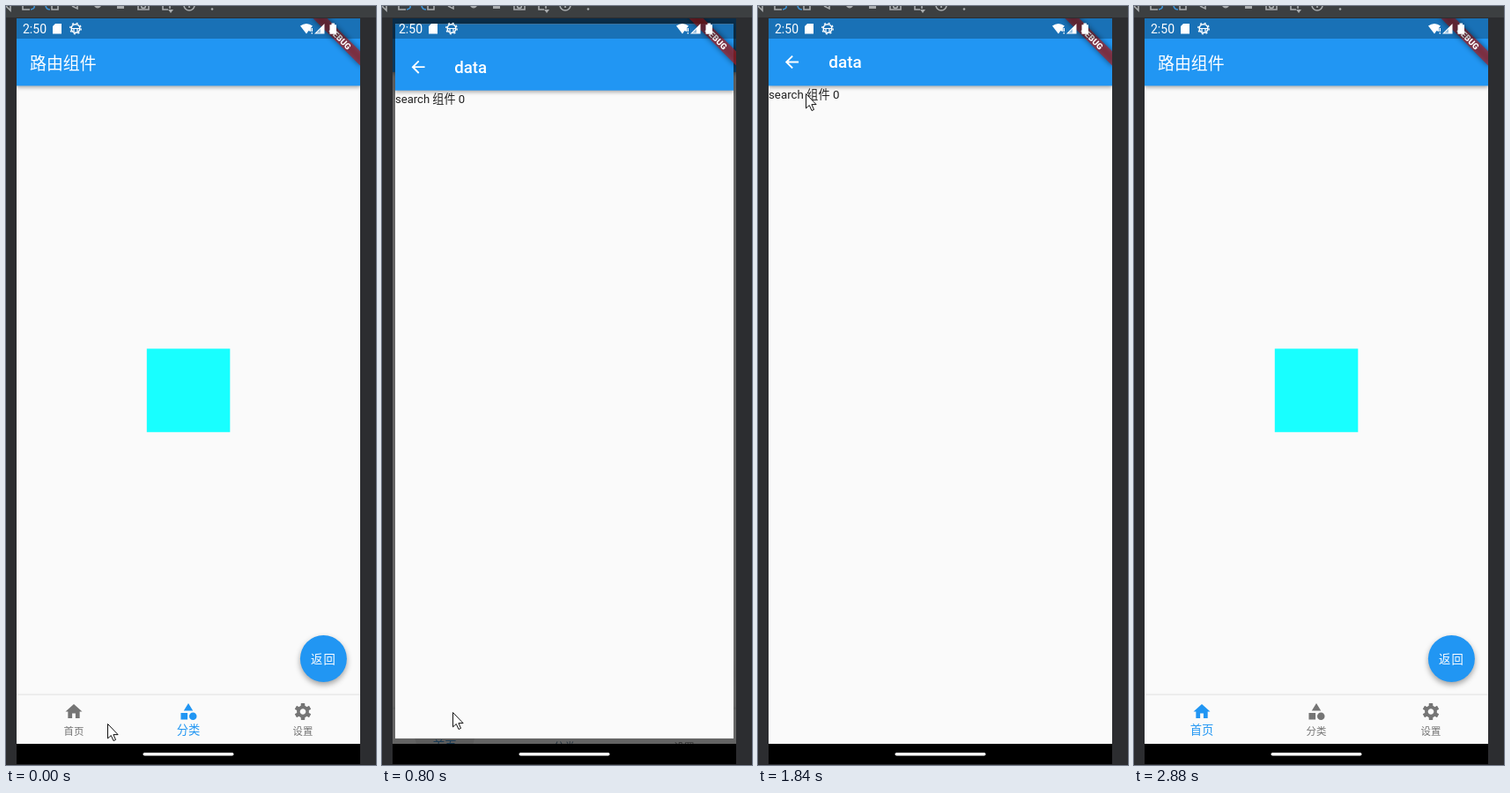
These frames come from a looping animation (420 by 860 pixels, 3.28 s). An HTML page:

```html
<!DOCTYPE html>
<html lang="zh">
<head>
<meta charset="utf-8">
<style>
html, body { margin: 0; width: 100%; height: 100%; overflow: hidden; background: #2c2d30; }
svg { display: block; width: 100%; height: 100%; }
text { font-family: Roboto, "Noto Sans CJK SC", "Noto Sans CJK", sans-serif; white-space: pre; }
.bar { fill: #2196f3; filter: drop-shadow(0 2px 2px rgba(0,0,0,.32)); }
.tabs text { text-anchor: middle; }
.tools { fill: none; stroke: #a9acae; stroke-width: 1.6; }
</style>
</head>
<body>
<svg viewBox="0 0 420 860">
  <defs>
    <clipPath id="screen"><rect x="12" y="14" width="390" height="822"/></clipPath>
    <clipPath id="tabBar"><rect x="12" y="781" width="390" height="60"/></clipPath>
  </defs>

  <rect width="420" height="860" fill="#2c2d30"/>
  <rect width="420" height="13" fill="#3c3f41"/>
  <g class="tools">
    <path d="M0 0L5 5V0M19 0V4H27M52 0V4H59V0M75 0L81 3V0M178 0V4H184M186 0V3M208 0V2"/>
    <path d="M28 4Q33 3 32 0M45 0Q46 4 50 4" stroke="#3d94d8"/>
    <path d="M100 0Q104 5 108 0Z M126 0H134V3H126Z" fill="#a9acae" stroke="none"/>
    <path d="M150 0V4H162V0"/><circle cx="156" cy="0" r="2.4"/>
    <path d="M184 4H190L187 8Z" fill="#a9acae" stroke="none"/>
    <circle cx="208" cy="-1" r="6"/>
    <circle cx="234" cy="3.5" r="1.3" fill="#a9acae" stroke="none"/>
  </g>

  <g clip-path="url(#screen)">
    <g id="back">
      <rect x="12" y="14" width="390" height="846" fill="#fafafa"/>
      <rect class="bar" x="12" y="14" width="390" height="76.4"/>
      <text x="27" y="71.7" font-size="18.9" fill="#fff">路由组件</text>
      <rect x="159.8" y="388.3" width="94.5" height="94.5" fill="#18ffff"/>
      <rect x="12" y="781" width="390" height="79" fill="#fafafa" style="filter:drop-shadow(0 -1px 1px rgba(0,0,0,.1))"/>
      <circle id="tabRipple" cx="77" cy="807" r="33" fill="#000" fill-opacity=".065" clip-path="url(#tabBar)"/>
      <g class="tabs" id="tabs"></g>
      <circle cx="360.4" cy="739.6" r="26.5" fill="#2196f3" style="filter:drop-shadow(0 3px 3px rgba(0,0,0,.36))"/>
      <text x="346" y="745.4" font-size="13.3" letter-spacing="1.1" fill="#fff">返回</text>
    </g>
    <rect id="scrim" x="12" y="14" width="390" height="822"/>
    <g id="front">
      <rect x="12" y="14" width="390" height="822" fill="#fafafa"/>
      <rect class="bar" x="12" y="14" width="390" height="76.4"/>
      <circle id="backRipple" cx="38.5" cy="63.5" r="19" fill="#fff" fill-opacity=".2"/>
      <path transform="translate(27.1 52.1) scale(.95)" fill="#fff" d="M20 11H7.83l5.59-5.59L12 4l-8 8 8 8 1.41-1.41L7.83 13H20z"/>
      <text x="80.3" y="70.3" font-size="18.9" font-weight="500" fill="#fff">data</text>
      <text x="12" y="105" font-size="13.3" fill="#212121">search 组件 0</text>
    </g>

    <g transform="translate(379.3 36.7) rotate(45)">
      <rect x="-38" y="-5.7" width="76" height="11.4" fill-opacity=".5" style="filter:blur(3px)"/>
      <rect x="-38" y="-5.7" width="76" height="11.4" fill="#b71c1c" fill-opacity=".63"/>
      <text y="3.5" font-size="9.6" font-weight="900" text-anchor="middle" fill="#fff">DEBUG</text>
    </g>
    <rect x="12" y="14" width="390" height="23" fill-opacity=".25"/>
    <g fill="#fff">
      <text x="19" y="31" font-size="14">2:50</text>
      <path d="M53 23L56 20H63V31.5H53Z"/>
      <g fill="none" stroke="#fff">
        <circle cx="79" cy="25.5" r="4.8" stroke-width="1.5"/>
        <circle cx="79" cy="25.5" r="6.2" stroke-width="1.4" stroke-dasharray="2 2.87"/>
        <path d="M74.5 25.5H83.5M77 25.5V29.5M81 25.5V29.5" stroke-width="1.2"/>
      </g>
      <path d="M334 22.5Q341 17.5 348 22.5L346 25V29L343.5 28L341 31.5ZM346.6 25H348V29H346.6ZM346.6 30H348V31.5H346.6Z"/>
      <path d="M350 31.5L361.5 20V31.5Z"/>
      <path d="M352.5 30.6L357 26V30.6Z" fill="#1970b6" fill-opacity=".45"/>
      <path d="M367.5 21.2H369.5V19.5H373V21.2H375V31.8H367.5Z"/>
    </g>
  </g>

  <rect x="12" y="836" width="390" height="23" fill="#000"/>
  <rect x="155.5" y="846" width="103" height="3.6" rx="1.8" fill="#fff"/>
  <path id="cursor" d="M0 0V16.4L3.8 13L6.5 19L9 17.9L6.4 12.1H11.6Z" fill="#fff" stroke="#111" stroke-width="1"/>
</svg>
<script>
const LOOP = 3280, STEP = 80;
const PUSH = 670, POP = 2158, ZOOM_TIME = 300, TAB_TIME = 200;
const $ = id => document.getElementById(id);

// Stops of the pointer: ms, x, y.
const stops = [[0, 115, 813], [480, 66, 792], [720, 66, 792], [880, 94, 808], [1440, 38, 218],
  [1700, 34, 62], [1840, 54, 99], [2160, 54, 99], [2240, 61, 112], [2560, 425, 210]];

const lerp = (a, b, p) => a + (b - a) * p;
const progress = (t, from, to) => Math.min(1, Math.max(0, (t - from) / (to - from)));
const smooth = p => p * p * (3 - 2 * p);

// Slow start for the first sixth, then a long ease-out.
const zoomEase = v => v < 1 / 6
  ? .4 * (6 * v) ** 3
  : 1 - .6 * (1 - progress(v, 1 / 6, 1)) ** 4.6;

function pointer(t) {
  const last = stops.length - 1;
  const i = Math.min(last, stops.findIndex(stop => stop[0] > t) + last + 1 - (last + 1)) ;
  const next = i < 0 ? last : i;
  const a = stops[next - 1], b = stops[next];
  const p = progress(t, a[0], b[0]);
  return [lerp(a[1], b[1], p), lerp(a[2], b[2], p)];
}

const teeth = Array.from({ length: 6 }, (_, i) =>
  `<rect x="-2.4" y="-9.9" width="4.8" height="4.5" rx=".6" transform="rotate(${60 * i})"/>`).join("");
const icons = [
  `<path d="M10 20v-6h4v6h5v-8h3L12 3 2 12h3v8z"/>`,
  `<path d="M12 2L6.5 11H17.5ZM3 13.5H11V21.5H3Z"/><circle cx="17.5" cy="17.5" r="4.5"/>`,
  `<g transform="translate(12 12)">${teeth}<circle r="5.4" fill="none" stroke="currentColor" stroke-width="3.8"/></g>`
];
$("tabs").innerHTML = ["首页", "分类", "设置"].map((label, i) => {
  const x = 77 + 130 * i;
  return `<g fill="currentColor"><g transform="translate(${x - 11.4} 788.1) scale(.95)">${icons[i]}</g><text x="${x}">${label}</text></g>`;
}).join("");

function styleTab(tab, p) {
  const label = tab.querySelector("text");
  tab.style.color = `rgb(${lerp(117, 33, p)},${lerp(117, 150, p)},${lerp(117, 243, p)})`;
  label.setAttribute("font-size", lerp(11.4, 13.3, p));
  label.setAttribute("y", lerp(826.3, 825.4, p));
}

const zoom = (id, scale) =>
  $(id).setAttribute("transform", `translate(207 436) scale(${scale}) translate(-207 -436)`);
const fade = (id, opacity) => $(id).setAttribute("opacity", opacity);

function draw(t) {
  const [x, y] = pointer(t);
  $("cursor").setAttribute("transform", `translate(${x + .5} ${y + .5})`);

  const push = progress(t, PUSH, PUSH + ZOOM_TIME);
  const pop = progress(t, POP, POP + ZOOM_TIME);
  const popping = t >= POP + STEP;
  zoom("back", popping ? lerp(1.1, 1, zoomEase(pop)) : lerp(1, 1.05, zoomEase(push)));
  zoom("front", lerp(.85, 1, zoomEase(push)));
  fade("front", popping ? 0 : progress(push, .125, .25));
  fade("scrim", popping ? 0 : .6 * progress(push, .2075, .4175));
  fade("tabRipple", push > 0 && push < 1 ? 1 : 0);
  fade("backRipple", t >= 1680 && t < 1840 ? 1 : 0);

  const home = smooth(progress(t, PUSH, PUSH + TAB_TIME));
  [home, 1 - home, 0].forEach((p, i) => styleTab($("tabs").children[i], p));
}
</script>
<script>
const start = performance.now();
function tick() {
  const t = (performance.now() - start) % LOOP;
  draw(Math.floor(t / STEP) * STEP);
  requestAnimationFrame(tick);
}
tick();
</script>
</body>
</html>
```
